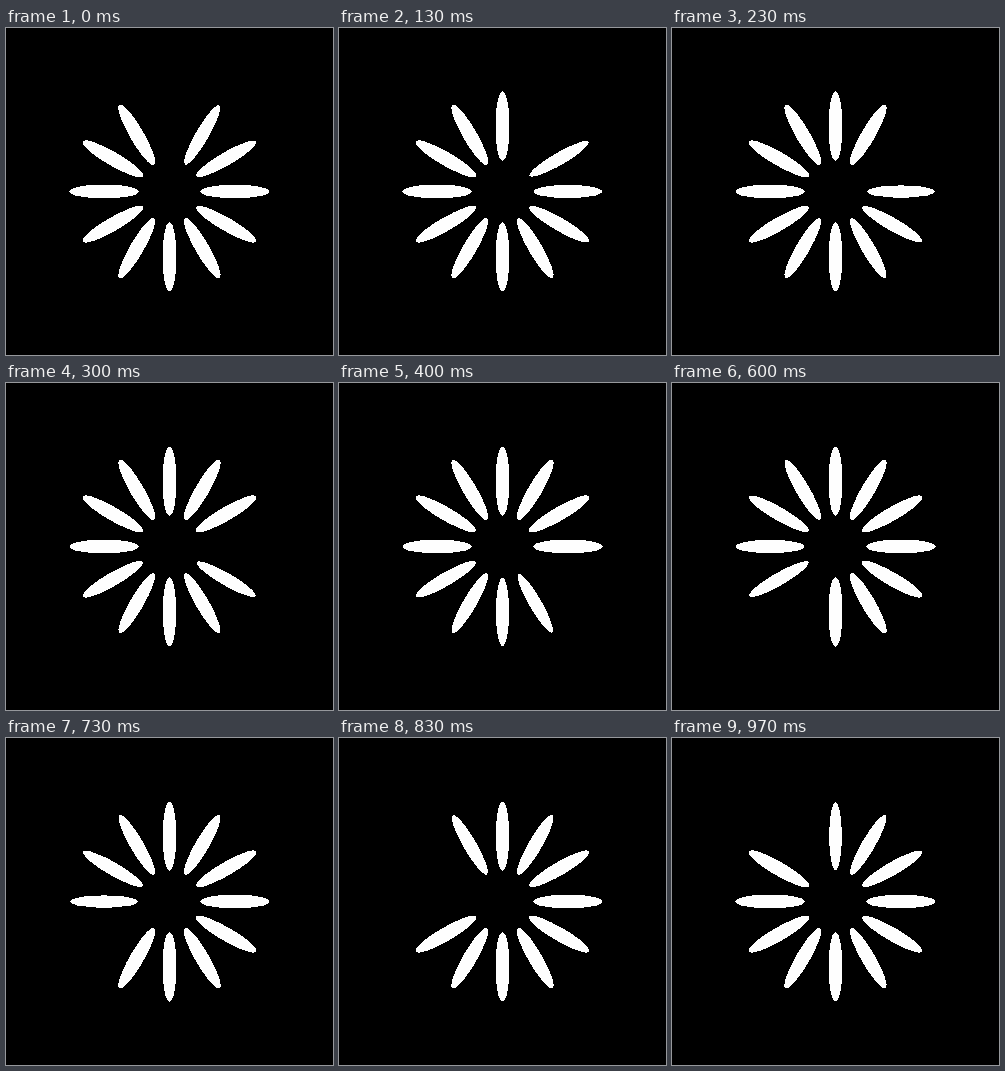
An HTML page with a canvas that plays this animation: 327x327 px, repeating every 1000 ms.

```html
<!DOCTYPE html>
<html lang="en">
<head>
<meta charset="utf-8">
<title>Spinner</title>
<style>
  html, body { margin: 0; width: 100%; height: 100%; overflow: hidden; background: #000; }
  canvas { display: block; width: 327px; height: 327px; image-rendering: pixelated; }
</style>
</head>
<body>
<canvas id="stage" width="327" height="327"></canvas>
<script>
const SIZE = 327, UNIT = SIZE / 100, PETALS = 12, LOOP = 1000;
const CUTOFF = 23; // alpha below this stays black, the rest turns solid
const ctx = document.getElementById('stage').getContext('2d', { willReadFrequently: true });

// 30 steps per loop, held 30, 40 and 30 ms in turn
function stepAt(ms) {
  const t = ms % LOOP, part = t % 100;
  return Math.floor(t / 100) * 3 + (part < 30 ? 0 : part < 70 ? 1 : 2);
}

// Each petal fades from 1 to 0 over the loop, counted in sixtieths
function opacity(i, step) {
  const age = (2 * step - 5 * (i + 1) + 120) % 60;
  if (age === 0 && step % 15) return 0; // restart falls just after this step
  return 1 - age / 60;
}

function drawPetal(i, alpha) {
  ctx.save();
  ctx.translate(SIZE / 2, SIZE / 2);
  ctx.rotate(i * 2 * Math.PI / PETALS);
  ctx.globalAlpha = alpha;
  ctx.beginPath();
  ctx.ellipse(0, -20 * UNIT, 2 * UNIT, 10.5 * UNIT, 0, 0, 2 * Math.PI);
  ctx.fill();
  ctx.restore();
}

function harden() {
  const img = ctx.getImageData(0, 0, SIZE, SIZE), px = img.data;
  for (let p = 0; p < px.length; p += 4) {
    const on = px[p + 3] >= CUTOFF;
    px[p] = px[p + 1] = px[p + 2] = on ? 254 : 0;
    px[p + 3] = 255;
  }
  ctx.putImageData(img, 0, 0);
}

function draw(step) {
  ctx.clearRect(0, 0, SIZE, SIZE);
  ctx.fillStyle = '#fff';
  for (let i = 0; i < PETALS; i++) drawPetal(i, opacity(i, step));
  harden();
}

let shown = -1;
const start = performance.now();
function tick() {
  const step = stepAt(performance.now() - start);
  if (step !== shown) draw(shown = step);
  requestAnimationFrame(tick);
}
tick();
</script>
</body>
</html>
```
